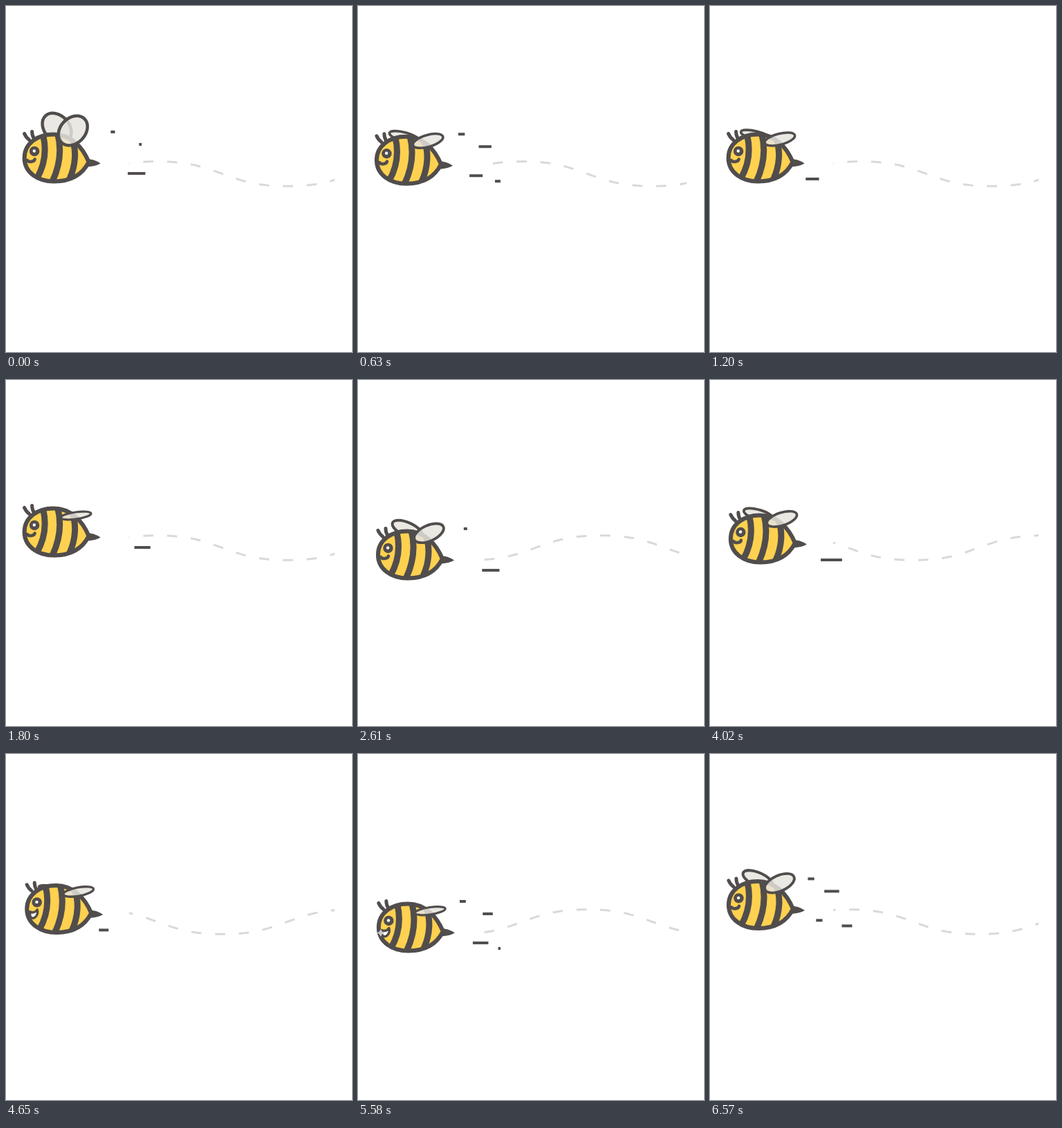
Recreate the animation shown at these times as an HTML page with a canvas. Size 500 px wide and 500 px high, loop 6.6 s.

```html
<!DOCTYPE html>
<html lang="en">
<head>
<meta charset="utf-8">
<title>Flying bee</title>
<style>
  html, body { margin: 0; width: 100%; height: 100%; overflow: hidden; background: #fff; }
  canvas { display: block; width: 500px; height: 500px; }
</style>
</head>
<body>
<canvas id="stage" width="500" height="500"></canvas>
<script>
const ctx = document.getElementById('stage').getContext('2d');
const LOOP = 6600, STEP = 30, BOB = LOOP / 11, FLAP = LOOP / 35, GUST = LOOP / 40;
const DARK = '#514d4c', YELLOW = '#ffd150', WING = 'rgba(230,228,222,.84)', TRAIL = '#d9d9d9';
const TAU = Math.PI * 2;

const BODY = new Path2D('M27 220 C27 199 46 186 69 186 C94 186 111 204 120 226 C110 246 92 254 70 254 C46 254 27 241 27 220Z');
const STING = new Path2D('M117 221 L127 223 Q133 225 137 228 Q131 232 118 233Z');
const STRIPES = new Path2D('M54 187 C59 208 57 229 45 250 M75 185 C81 208 78 232 67 255 M95 190 C103 208 101 232 92 251');
const FEELERS = new Path2D('M27 185 Q29 190 34 194 M38 182 Q38 188 41 192');
const SMILE = new Path2D('M31 223.500 Q33 226 37 225.500 Q41.500 225 42 222');
const GRIN = new Path2D('M31 224 Q38 227 42 221 Q44 227 39 232 Q35 235 32 231Z');

// Birth and life are fractions of one gust.
const STREAKS = [
  { y: 182.5, left: 133, length: 25, birth: .67, life: .45 },
  { y: 200.5, left: 140, length: 56, birth: .655, life: .37 },
  { y: 242.5, left: 148, length: 66, birth: .78, life: .52 },
  { y: 250.5, left: 126, length: 80, birth: .29, life: .66 }
];

function height(t) {
  const a = TAU * (t + 56) / BOB;
  return 235.3 - 18.8 * Math.cos(a) + Math.cos(3 * a);
}

function stroke(path, width, color = DARK) {
  ctx.lineWidth = width;
  ctx.strokeStyle = color;
  ctx.stroke(path);
}

function fill(path, color) {
  ctx.fillStyle = color;
  ctx.fill(path);
}

function disc(x, y, r, color) {
  const p = new Path2D();
  p.arc(x, y, r, 0, TAU);
  fill(p, color);
}

function drawTrail(t) {
  const p = new Path2D();
  for (let x = 178; x <= 475; x += 3) p.lineTo(x, height(t - (x - 183.4) / .6267) + 7.2);
  const start = 193.5 + 11 * Math.cos(TAU * (t - 495) / BOB);
  ctx.setLineDash([14.6, 19.8]);
  ctx.lineDashOffset = 178 - start;
  stroke(p, 3, TRAIL);
  ctx.setLineDash([]);
}

function drawStreaks(t) {
  const clock = t / GUST + .22 * Math.sin(Math.PI * t / LOOP);
  for (const { y, left, length, birth, life } of STREAKS) {
    const age = (clock - birth + 1) % 1 / life;
    if (age >= 1) continue;
    const from = left + length * age;
    const to = left + length * (1 - (1 - age) ** 3);
    if (to - from > 3) stroke(new Path2D(`M${from} ${y}H${to}`), 4);
  }
}

function drawWing(x, y, rx, ry, degrees, open) {
  const p = new Path2D();
  p.ellipse(x, y, rx, ry, degrees * Math.PI / 180, 0, TAU);
  fill(p, WING);
  stroke(p, 3.2 + 1.4 * open);
}

function drawBackWing(open) {
  const v = Math.max(0, 1.15 * Math.sqrt(open) - .15), q = v * v;
  drawWing(66 + 8.5 * q, 195 - 19 * v, 22 + 2 * v, 4 + 15 * q, 8 + 42 * q, v);
}

function drawFrontWing(open) {
  drawWing(101.5 - 5 * open ** 2, 196.5 - 17 * open, 22 + 2 * open, 5 + 14 * open, -8 - 42 * open ** 1.2, open);
}

function drawFace(t) {
  disc(41.5, 210.5, 7.2, DARK);
  disc(41.2, 210, 2.2, '#fff');
  if (t < 4120 || t > 6030) return stroke(SMILE, 4.6);
  fill(GRIN, '#fff');
  stroke(GRIN, 3.4);
}

function drawGlint(t) {
  const k = (t - 4900) / 800;
  if (k <= 0 || k >= 1) return;
  const r = 12 * Math.sin(Math.PI * k), p = new Path2D();
  for (let i = 0; i < 8; i++) {
    const a = i * TAU / 8, d = i % 2 ? r * .5 : r;
    p.lineTo(30 + d * Math.cos(a), 228 + d * Math.sin(a));
  }
  p.closePath();
  fill(p, 'rgba(208,208,208,.95)');
}

function drawBee(t) {
  // Wings snap open and ease shut around the peak of each flap.
  const offset = Math.abs((t / FLAP + .45) % 1 - .5);
  const open = 1.12 * (1 - 2 * offset) ** 1.7;
  ctx.lineCap = ctx.lineJoin = 'round';
  drawBackWing(open);
  stroke(FEELERS, 5);
  fill(STING, DARK);
  fill(BODY, YELLOW);
  ctx.save();
  ctx.clip(BODY);
  stroke(STRIPES, 9);
  ctx.restore();
  stroke(BODY, 6);
  drawFace(t);
  drawFrontWing(open);
  drawGlint(t);
}

function draw(now) {
  const t = Math.floor(now % LOOP / STEP) * STEP;
  ctx.fillStyle = '#fff';
  ctx.fillRect(0, 0, 500, 500);
  drawTrail(t);
  ctx.save();
  ctx.translate(0, height(t) - 220);
  drawStreaks(t);
  ctx.translate(1.4 - 1.8 * Math.cos(2 * TAU * t / BOB), 0);
  drawBee(t);
  ctx.restore();
}

const begin = performance.now();
function loop() {
  draw(performance.now() - begin);
  requestAnimationFrame(loop);
}
loop();
</script>
</body>
</html>
```
